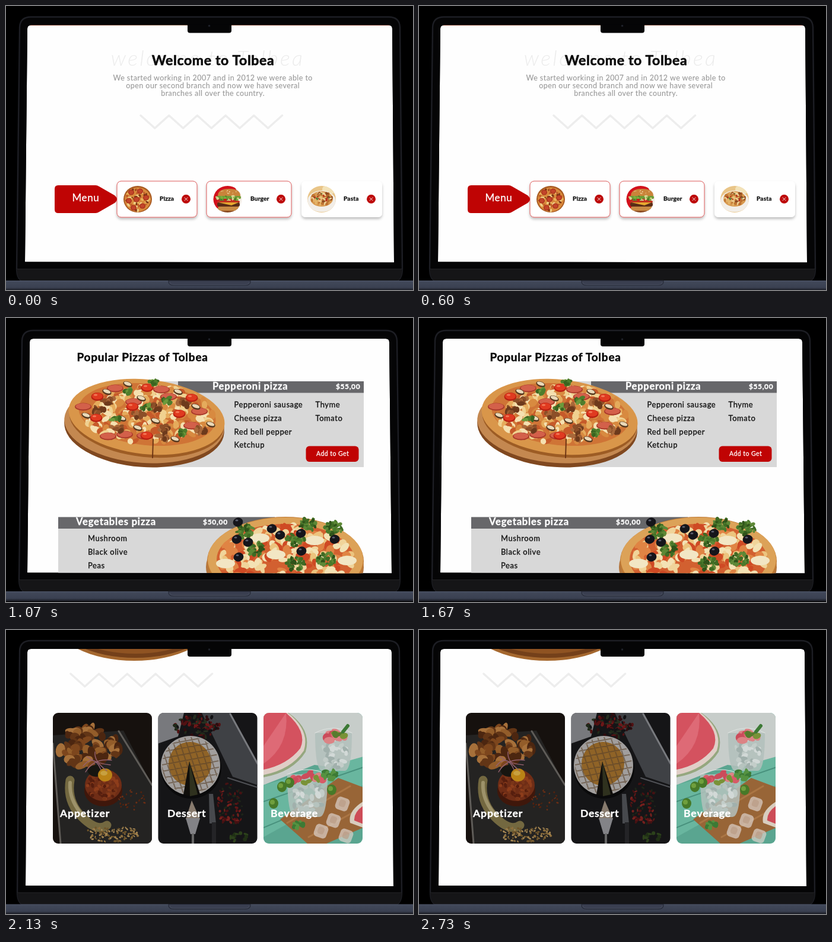
An HTML page that plays this animation: 686 by 480 pixels, repeating every 3130 ms.

```html
<!DOCTYPE html>
<html lang="en">
<head>
<meta charset="utf-8">
<title>Restaurant site on a laptop</title>
<style>
html, body { margin: 0; width: 100%; height: 100%; overflow: hidden; background: #000; }
svg { display: block; width: 686px; height: 480px; }
text { font-family: Lato, "Open Sans", sans-serif; stroke-linejoin: round; }
</style>
</head>
<body>
<svg id="stage" viewBox="0 0 686 480"></svg>
<script>
const LOOP = 3130;

let seed = 1;
const rnd = () => {
  seed = (seed * 16807) % 2147483647;
  return seed / 2147483647;
};
const pick = list => list[Math.floor(rnd() * list.length)];

// Shape helpers
const path = (d, fill, extra = '') => `<path d="${d}" fill="${fill}" ${extra}/>`;
const line = (d, color, w, extra = '') =>
  path(d, 'none', `stroke="${color}" stroke-width="${w}" stroke-linecap="round" stroke-linejoin="round" ${extra}`);
const oval = (x, y, rx, ry, fill, rot = 0, extra = '') =>
  `<ellipse cx="${x}" cy="${y}" rx="${rx}" ry="${ry}" fill="${fill}" transform="rotate(${rot} ${x} ${y})" ${extra}/>`;
const box = (x, y, w, h, fill, r = 0, extra = '') =>
  `<rect x="${x}" y="${y}" width="${w}" height="${h}" rx="${r}" fill="${fill}" ${extra}/>`;
const text = (x, y, s, size, color, gap = 0, weight = 700, bold = 0.4, extra = '') =>
  `<text x="${x}" y="${y}" font-size="${size}" font-weight="${weight}" fill="${color}" stroke="${color}" stroke-width="${bold}" letter-spacing="${gap}" ${extra}>${s}</text>`;
const clip = (id, shape, body) =>
  `<clipPath id="${id}">${shape}</clipPath><g clip-path="url(#${id})">${body}</g>`;
const each = (points, draw) => points.map(([x, y]) => draw(x, y)).join('');

// Random spots inside an ellipse, drawn from back to front
function scatter(n, cx, cy, rx, ry, draw) {
  const spots = [];
  for (let i = 0; i < n; i++) {
    const a = rnd() * Math.PI * 2, r = Math.sqrt(rnd());
    spots.push([cx + rx * r * Math.cos(a), cy + ry * r * Math.sin(a)]);
  }
  return each(spots.sort((p, q) => p[1] - q[1]), draw);
}
const specks = (n, cx, cy, rx, ry, size, colors) =>
  scatter(n, cx, cy, rx, ry, (x, y) =>
    oval(x, y, size * (0.6 + rnd() * 0.6), size * (0.4 + rnd() * 0.4), pick(colors), rnd() * 180));

const zigzag = (x, y) => {
  let d = `M${x} ${y}`;
  for (let i = 0; i < 10; i++) d += `l23.85 ${i % 2 ? -21.5 : 21.5}`;
  return line(d, '#ededed', 3.4);
};

// Screen corners: top-left x, top-right x, top y, bottom-left x, bottom-right x, bottom y
function laptop(id, l, r, t, bl, br, b, page) {
  const base = b + 31;
  const lid = `M${bl - 6} ${base}Q${bl - 14} ${base - 4} ${bl - 14} ${b + 10}L${l - 13} ${t + 3}Q${l - 12} ${t - 14} ${l + 6} ${t - 14}H${r - 6}Q${r + 12} ${t - 14} ${r + 13} ${t + 3}L${br + 14} ${b + 10}Q${br + 14} ${base - 4} ${br + 6} ${base}z`;
  const screen = `M${bl} ${b - 0.5}L${l} ${t + 6}Q${l} ${t} ${l + 6} ${t}H${r - 6}Q${r} ${t} ${r} ${t + 6}L${br} ${b + 0.5}z`;
  return path(lid, '#050506', 'stroke="#1d1e24" stroke-width="2.4"') +
    clip(id + 'lid', path(lid, '#fff'), box(0, b + 11, 686, 20, '#151517') + box(0, b + 11, 686, 1, '#222225')) +
    clip(id, path(screen, '#fff'), path(screen, '#fefefe') + page) +
    path(`M306 ${t - 1}h74v10q0 4-4 4h-66q-4 0-4-4z`, '#050506') +
    oval(342.5, t + 1, 2, 2, '#15171c') + oval(342.5, t + 1, 0.8, 0.8, '#333845') +
    box(0, base, 686, 17, 'url(#metal)') +
    path(`M274 ${base}h138v2q0 6-8 6h-122q-8 0-8-6z`, '#3a3f50', 'stroke="#222632"') +
    line(`M276 ${base + 3}q1 4 7 4h120q6 0 7-4`, '#4c5264', 0.8);
}

// Menu page
function dish(x, w, label, labelX, crossX, red, photo) {
  return box(x, 296, w, 61, '#fff', 7, `filter="url(#soft)" ${red ? 'stroke="#dd5a5a"' : ''}`) + photo +
    text(labelX, 328.5, label, 10.3, '#111', 0.1, 700, 0.3) +
    oval(crossX, 326.3, 7.5, 7.5, '#bd0a0a') +
    line(`M${crossX - 2.5} 323.8l5 5m0-5l-5 5`, '#fff', 0.9);
}
const thumb = (id, x, body) => clip(id, oval(x, 326.5, 24, 22.5, '#fff'), body);

function menuPage() {
  const pizza = thumb('pizza', 222, box(197, 303, 50, 48, '#a85a22') + oval(222, 327, 22, 20.5, '#d98a3c') +
    specks(60, 222, 327, 20, 19, 3, ['#e8b45a', '#c4602a', '#efcf86', '#7c3516']) +
    each([[211, 315], [226, 313], [236, 324], [220, 327], [207, 329], [230, 338], [215, 341]],
      (x, y) => oval(x, y, 5, 4.5, '#a9301c') + oval(x, y, 3.6, 3.2, '#c2452a')));
  const burger = thumb('burger', 373.5, box(348, 302, 52, 50, '#f4ece6') +
    oval(366, 320, 24, 24, '#d3111c') + box(356, 342, 40, 8, '#8c4c22', 4) +
    path('M357 321q0-12 19-12t19 12z', '#c9843a') + specks(14, 376, 314, 14, 3, 1, ['#f4dba8']) +
    box(354, 321, 42, 5, '#6f9c34', 2) + specks(24, 375, 325, 21, 4, 3, ['#7fae3c', '#4f7d27', '#d8d490']) +
    box(356, 329, 38, 4, '#c2341f', 2) + box(356, 332, 38, 7, '#5a2d17', 3) + path('M358 332h34l-12 5z', '#e6a830') +
    box(357, 339, 37, 7, '#c88a44', 3));
  const pasta = thumb('pasta', 532, box(507, 302, 50, 50, '#e9c588') + oval(545, 310, 12, 8, '#f3e2b8') +
    oval(532, 330, 24, 18, '#f2eee8') + oval(532, 326, 19, 13, '#d89a50') +
    specks(55, 532, 326, 17, 11, 3.6, ['#e4b468', '#bd7230', '#efd096', '#8f4a20']) +
    specks(10, 532, 324, 14, 8, 2, ['#5f7a34', '#b8301c']));
  const para = ['We started working in 2007 and in 2012 we were able to',
    'open our second branch and now we have several', 'branches all over the country.'];
  return box(40, 32, 612, 1, 'url(#ember)') +
    text(340, 101, 'welcome to Tolbea', 36, '#ececec', 3.3, 300, 0, 'text-anchor="middle" font-style="italic"') +
    text(349, 99.5, 'Welcome to Tolbea', 23, '#0a0a0a', 0.65, 700, 0.6, 'text-anchor="middle"') +
    para.map((s, i) => text(348.7, 125.5 + i * 13.3, s, 12.5, '#999', 0.45, 400, 0.1, 'text-anchor="middle"')).join('') +
    zigzag(227, 185) +
    dish(187, 135, 'Pizza', 259, 303.5, true, pizza) +
    dish(338, 143, 'Burger', 412, 463.5, true, burger) +
    dish(498, 136, 'Pasta', 569, 615.5, false, pasta) +
    path('M88 303H151Q154 303 157 305L183 320Q191 326.5 183 333L157 348Q154 350 151 350H88Q82 350 82 344V309Q82 303 88 303z', '#bf0404') +
    text(111.5, 330, 'Menu', 17, '#fff', 0.6, 400, 0.3);
}

// Pizza page
const leaf = (x, y) => specks(9, x, y, 8, 5, 5, ['#4f7d2c', '#3a6420', '#6c9a3c']);
const parsley = (x, y) => specks(30, x, y, 15, 11, 4.5, ['#3f6b24', '#2f531a', '#5d8836', '#4a7a2c']);
const tomato = (x, y) => oval(x, y, 10.5, 7, '#b81f12') + oval(x, y - 1, 9, 5.5, '#e03a20') + oval(x - 3, y - 3, 3, 1.5, '#f47a58');
const salami = (x, y) => oval(x, y, 14, 6.5, '#a8382a') + oval(x, y - 0.7, 12.5, 5.3, '#d3604a');
const sausage = (x, y) => specks(10, x, y, 11, 6, 6, ['#8c4f28', '#a8683a', '#6d3a1c']);
const mushroom = (x, y) => oval(x, y, 8, 4.5, '#54381f', 20) + oval(x, y - 1, 6.5, 3, '#ead9b8', 20);
const olive = (x, y) => oval(x, y, 8.5, 7.5, '#15151b', -20) + oval(x - 2, y - 3, 2.5, 1.5, '#5c5f70');

const pepperoniPizza = () =>
  oval(233, 185, 135, 67, '#80481f', 4) + oval(233, 179, 135, 66, '#c48850', 4) +
  oval(237, 172, 131, 63, '#9d5c24', 6) + oval(237, 167, 132, 63, '#d9964a', 6) +
  oval(238, 163, 116, 52, '#cf7436', 6) +
  specks(260, 238, 163, 110, 48, 8, ['#f0d190', '#e5ab5c', '#c65a2a', '#f5e0b0', '#d88a40']) +
  each([[184, 119], [215, 142], [172, 200], [274, 133], [313, 182], [326, 158], [234, 199], [130, 150], [262, 121], [200, 197]], salami) +
  each([[155, 155], [186, 187], [268, 186], [300, 143], [222, 164], [174, 140], [330, 190], [252, 150], [266, 200]], sausage) +
  each([[228, 136], [222, 186], [252, 174], [135, 165], [195, 170], [290, 125], [320, 150], [170, 125], [285, 205], [205, 112], [345, 180]], mushroom) +
  each([[238, 118], [213, 150], [292, 162], [154, 133], [152, 169], [237, 199], [313, 135]], tomato) +
  each([[272, 140], [295, 193], [185, 171], [237, 151], [207, 123], [246, 108]], leaf) +
  line('M248 205L247 236', '#6d3514', 2);

const vegetablePizza = () =>
  oval(470, 421, 133, 72, '#b4763e') + oval(471, 411, 132, 75, '#c07a34') + oval(471, 408, 131, 71, '#dca258') +
  oval(471, 408, 116, 60, '#d26030') +
  specks(230, 471, 406, 111, 55, 9, ['#f3e2b4', '#ecc47e', '#cf4a24', '#e08444', '#f0d49a']) +
  each([[428, 372], [520, 376], [455, 400], [575, 410], [370, 415]], (x, y) => oval(x, y, 16, 8, '#f2e6c4')) +
  each([[402, 360], [420, 390], [488, 375], [512, 348], [540, 408], [487, 416], [552, 355]], parsley) +
  each([[391, 345], [448, 356], [462, 367], [389, 374], [408, 379], [392, 404], [497, 364], [554, 374], [498, 394]], olive);

const list = (x, y, items) =>
  items.map((s, i) => text(x, y + i * 22.8, s, 13, '#151515', 0.56, 400, 0.35)).join('');

function pizzaPage() {
  return text(119.5, 73, 'Popular Pizzas of Tolbea', 19, '#0a0a0a', 0.78, 700, 0.5) +
    box(240, 107, 363, 145, '#d8d8d8') + box(290, 107, 313, 19.5, '#67676a') + pepperoniPizza() +
    text(348, 120.5, 'Pepperoni pizza', 16.5, '#fff', 0.75) +
    text(556, 119.5, '$55,00', 12, '#fff', 0.6) +
    list(384.5, 151, ['Pepperoni sausage', 'Cheese pizza', 'Red bell pepper', 'Ketchup']) +
    list(521.5, 151, ['Thyme', 'Tomato']) +
    box(505.5, 216.5, 89, 26.5, '#c00303', 6) +
    text(523, 232.5, 'Add to Get', 10.5, '#fff', 0.45, 400, 0.3) +
    box(88, 336.5, 365, 110, '#d8d8d8') + box(88, 336.5, 365, 19.5, '#67676a') + vegetablePizza() +
    text(118, 350, 'Vegetables pizza', 16.5, '#fff', 0.85) +
    text(332, 349, '$50,00', 12, '#fff', 0.7) +
    list(138, 377, ['Mushroom', 'Black olive', 'Peas']);
}

// Category page
const appetizer = () =>
  box(79, 140, 168, 221, '#1b1512') +
  path('M79 178L198 170L246 262V361H92z', '#2d2c2a') +
  line('M79 192L92 361M190 171L246 262', '#77736e', 3) +
  specks(75, 140, 198, 50, 32, 10, ['#9c5824', '#b87434', '#7a421c', '#cf8c48', '#5f3014']) +
  line('M108 254Q102 290 128 316T170 330', '#8f8250', 15) + line('M108 258Q106 288 130 314', '#c4b684', 6) +
  oval(164, 272, 32, 26, '#4f1d0e') + oval(164, 262, 31, 27, '#8a381c') +
  specks(60, 164, 264, 27, 23, 4, ['#b04c22', '#6b2611', '#98421e']) +
  oval(152, 238, 14, 10, '#1c1a14') + oval(167, 245, 12, 11, '#e8a41c') + oval(165, 242, 6, 4, '#f8c850') +
  line('M130 230q18-22 30 6M136 214q16 12 40 14M150 206q-2 16 20 32M134 240q14-24 44-20', '#b8788a', 1.4) +
  specks(110, 178, 344, 46, 14, 2.2, ['#b08a4c', '#8a6a34', '#cfa868']) +
  specks(24, 212, 288, 22, 20, 2, ['#8c3a18', '#6b2a12']);

function dessert() {
  let lattice = '';
  for (let i = -4; i < 5; i++) lattice += `M${311 + i * 11 - 22} 178l34 104M258 ${230 + i * 11 + 10}l106-20`;
  return box(256, 140, 168, 221, '#1c1c1f') +
    path('M256 140h44l-10 40l-34 12z', '#a0a1a6') + path('M330 140h48L424 226V262L382 248z', '#54565c') +
    line('M378 142L424 226', '#a0a2a8', 3) + line('M374 250L424 266', '#6a6c72', 2) +
    specks(90, 322, 162, 38, 20, 3.6, ['#6d1618', '#901f20', '#2a3622', '#34402a', '#3d1012', '#18181a']) +
    oval(312, 234, 51, 51, '#0d0d0e') + oval(311, 229, 50, 50, '#d6d3d1') +
    oval(310, 226, 36, 37, '#bf8434') +
    clip('pie', oval(311, 229, 48, 48, '#fff'), line(lattice, '#77583a', 2, 'opacity=".6"')) +
    path('M309 222L327 277Q314 284 299 278z', '#15130f') + path('M309 222L323 278L310 281z', '#3f4128') +
    path('M313 288L327 320H303z', '#b5a493') + path('M303 318h24l-8 27h-8z', '#aeafb4') + box(313, 344, 4, 17, '#888') +
    path('M342 277h7l5 50h-11z', '#5f6166') + box(347, 325, 7, 36, '#303034') +
    specks(75, 378, 296, 24, 38, 2.8, ['#801c1c', '#9c2a26', '#27301f', '#5d1618']) +
    specks(12, 392, 350, 16, 8, 4, ['#3b5624', '#2b401c']);
}

const lime = (x, y) => oval(x, y, 8, 9, '#4b7f2a') + oval(x - 2, y - 2, 4, 4, '#76a840');
const cube = (x, y) => box(x - 11, y - 11, 22, 22, '#e8ddd6', 6, `opacity=".7" transform="rotate(20 ${x} ${y})"`) +
  box(x - 6, y - 7, 11, 12, '#c4a58e', 4, `opacity=".7" transform="rotate(20 ${x} ${y})"`);
const glass = (x, y, w, h) =>
  path(`M${x - w} ${y}Q${x - w} ${y + h} ${x - w * 0.6} ${y + h}H${x + w * 0.6}Q${x + w} ${y + h} ${x + w} ${y}z`, '#bccac6', 'opacity=".85"') +
  specks(40, x, y + h * 0.55, w * 0.75, h * 0.38, 6, ['#dde5e2', '#aab9b5', '#cdd8d4', '#c0cdc8']) +
  specks(9, x, y + 6, w * 0.8, 9, 9, ['#e2606c', '#d65060', '#e88a8c']) +
  specks(4, x, y + 8, w * 0.7, 9, 7, ['#7f9a3a', '#5c8230']) +
  line(`M${x - w} ${y}q${w} -16 ${w * 2} 0`, '#e9efec', 1.2);

const beverage = () =>
  box(434, 140, 168, 221, '#5fae98') + path('M434 140H602V238L520 228L434 262z', '#d2d8d5') +
  path('M434 262L602 214V262L470 330L434 350z', '#6fc0a8') + line('M434 290L602 232M434 334L520 298', '#4c9984', 2) +
  path('M434 140H476Q516 168 505 206Q484 240 434 249z', '#9db086') +
  path('M434 140H475Q513 170 502 204Q480 236 434 245z', '#ecd9d2') +
  path('M434 140H472Q509 172 496 200Q474 228 434 236z', '#df5664') +
  path('M434 196L472 140Q478 196 434 226z', '#ea707c') +
  glass(552, 174, 31, 64) + line('M568 172l8-10', '#3f8038', 6) +
  path('M462 320L560 250L602 266V334L540 361H508z', '#a06a3a') + line('M474 326L580 264M510 350L600 300', '#b47c48', 3) +
  glass(508, 244, 34, 72) +
  each([[465, 265], [451, 293], [478, 258]], lime) + lime(549, 270) +
  specks(12, 545, 244, 11, 9, 6, ['#3f8038', '#5a9a44']) + specks(10, 490, 330, 13, 9, 5, ['#3f8038', '#5a9a44']) +
  each([[567, 294], [552, 322], [531, 340], [573, 348]], cube) +
  path('M602 290Q576 306 580 326L602 334z', '#e4d8c8') + path('M602 297Q586 308 587 322L602 328z', '#d8505c');

const tile = (id, x, label, labelX, gap, shade, photo) =>
  clip(id, box(x, 140, 167, 221, '#fff', 9), photo + box(x, 140, 167, 221, '#000', 0, `opacity="${shade}"`)) +
  text(labelX, 316, label, 17.5, '#fff', gap);

const categoryPage = () =>
  oval(216, -16, 134, 68, '#a5682f') + oval(218, -20, 133, 67, '#74401a') + oval(218, -26, 131, 66, '#8f5322') +
  zigzag(109, 74) +
  tile('appetizer', 79, 'Appetizer', 91, 0.9, 0.2, appetizer()) +
  tile('dessert', 256.5, 'Dessert', 272, 0.7, 0.25, dessert()) +
  tile('beverage', 434, 'Beverage', 446, 0.95, 0.05, beverage());

const defs = `<defs>
  <linearGradient id="metal" x2="0" y2="1">
    <stop offset="0" stop-color="#4e566a"/><stop offset=".12" stop-color="#414859"/>
    <stop offset=".7" stop-color="#3a4051"/><stop offset="1" stop-color="#15161c"/>
  </linearGradient>
  <linearGradient id="ember">
    <stop offset="0" stop-color="#d8542a"/><stop offset=".4" stop-color="#f0b080"/>
    <stop offset=".7" stop-color="#d8603a"/><stop offset="1" stop-color="#c04020"/>
  </linearGradient>
  <filter id="soft" x="-10%" y="-20%" width="120%" height="150%">
    <feDropShadow dx="0" dy="3" stdDeviation="2" flood-color="#000" flood-opacity=".25"/>
  </filter>
</defs>`;

// Start time and picture of each page
const scenes = [
  [0, laptop('s1', 36, 651, 32.5, 32, 654, 433, menuPage())],
  [1000, laptop('s2', 40, 646, 35, 36, 650, 431, pizzaPage())],
  [2070, laptop('s3', 36, 650, 32, 33, 653, 432.5, categoryPage())]
];

const stage = document.getElementById('stage');
stage.innerHTML = defs + scenes.map(s => `<g class="scene">${s[1]}</g>`).join('');
stage.querySelectorAll('.scene').forEach((el, i) => {
  const frames = scenes.map(([start], j) =>
    ({ offset: start / LOOP, opacity: i === j ? 1 : 0, easing: 'steps(1, end)' }));
  frames.push({ offset: 1, opacity: 0 });
  el.animate(frames, { duration: LOOP, iterations: Infinity });
});
</script>
</body>
</html>
```
